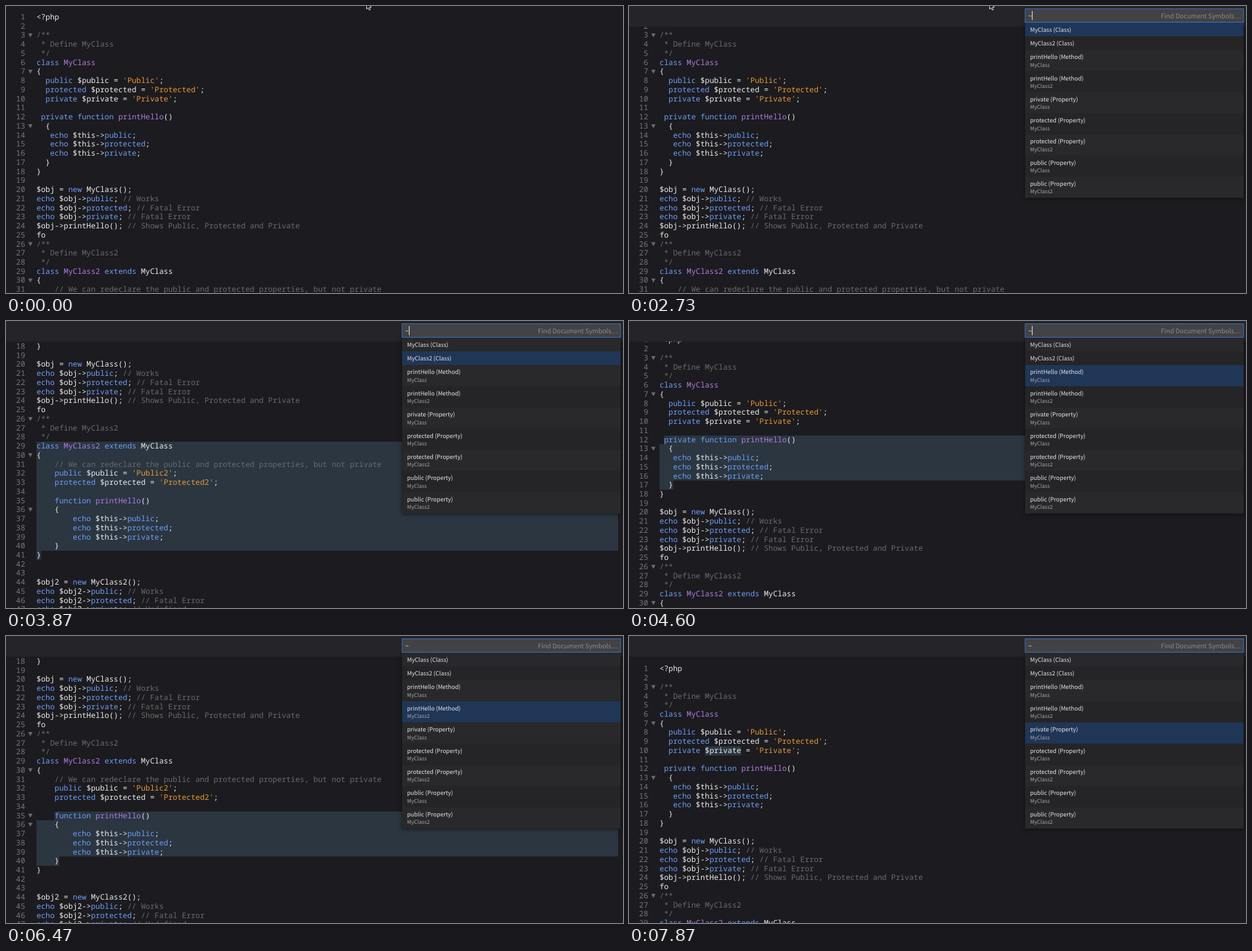
Animation of 1000 by 466 pixels, one loop 7.94 s. Source, as an HTML page with a canvas:

```html
<!DOCTYPE html>
<html lang="en">
<head>
<meta charset="utf-8">
<title>Find document symbols</title>
<style>
html, body { margin: 0; width: 100%; height: 100%; overflow: hidden; background: #1c1b1f; }
canvas { display: block; }
</style>
</head>
<body>
<canvas id="stage" width="1000" height="466"></canvas>
<script>
const ctx = document.getElementById('stage').getContext('2d');
const LOOP = 7940;
const LINE = 14.74, CHAR = 7.362, LEFT = 49.4, RIGHT = 992;
const MONO = '500 12.27px "Noto Sans Mono", "DejaVu Sans Mono", monospace';
const UI = '"Noto Sans CJK JP", "Noto Sans CJK SC", "Open Sans", sans-serif';
const COLOR = {
  back: '#1c1b1f', bar: '#252428', text: '#ececec', keyword: '#6c9ef8', name: '#b07be0',
  string: '#e59a35', comment: '#6b6a6c', gutter: '#77767a', selection: '#2b3641', active: '#203657'
};

const code = `<?php

/**
 * Define MyClass
 */
class MyClass
{
  public $public = 'Public';
  protected $protected = 'Protected';
  private $private = 'Private';

 private function printHello()
  {
   echo $this->public;
   echo $this->protected;
   echo $this->private;
  }
}

$obj = new MyClass();
echo $obj->public; // Works
echo $obj->protected; // Fatal Error
echo $obj->private; // Fatal Error
$obj->printHello(); // Shows Public, Protected and Private
fo
/**
 * Define MyClass2
 */
class MyClass2 extends MyClass
{
    // We can redeclare the public and protected properties, but not private
    public $public = 'Public2';
    protected $protected = 'Protected2';

    function printHello()
    {
        echo $this->public;
        echo $this->protected;
        echo $this->private;
    }
}


$obj2 = new MyClass2();
echo $obj2->public; // Works
echo $obj2->protected; // Fatal Error
echo $obj2->private; // Undefined`.split('\n');

const symbols = [
  ['MyClass (Class)'], ['MyClass2 (Class)'],
  ['printHello (Method)', 'MyClass'], ['printHello (Method)', 'MyClass2'],
  ['private (Property)', 'MyClass'],
  ['protected (Property)', 'MyClass'], ['protected (Property)', 'MyClass2'],
  ['public (Property)', 'MyClass'], ['public (Property)', 'MyClass2']
];

// selection: first line, first column, last line, end column
const steps = [
  { at: 0, scroll: 0 },
  { at: 2530, scroll: 0, row: 0 },
  { at: 3570, scroll: 227.6, row: 1, selection: [29, 0, 41, 1] },
  { at: 4330, scroll: -12.4, row: 2, selection: [12, 1, 17, 3] },
  { at: 5370, scroll: 227.6, row: 3, selection: [35, 4, 40, 5] },
  { at: 6900, scroll: -35.3, row: 4, selection: [10, 10, 10, 18] }
];
const EXTRA_FOLD = 6000, CARET_HALF = 560;
const folds = [3, 7, 13, 26, 30, 36];

const TOKEN = new RegExp([
  /(?<comment>\/\/.*|^\/\*\*| ^\*.*|^ \*.*)/, /(?<string>'[^']*')/,
  /(?<name>(?<=(?:class|function) )\w+)/, /(?<plain>\$\w+)/,
  /(?<keyword>\b(?:class|extends|public|protected|private|function|echo|new)\b)/,
  /(?<rest>\w+|[^\w\s$']+?(?=\/\/|\s|\w|\$|'|$))/
].map(r => r.source).join('|'), 'g');

const tokens = code.map(line => [...line.matchAll(TOKEN)].map(m => {
  const kind = Object.keys(m.groups).find(k => m.groups[k] !== undefined);
  return { text: m[0], col: m.index, color: COLOR[kind] || COLOR.text };
}));

function box(x, y, w, h, color) {
  ctx.fillStyle = color;
  ctx.fillRect(x, y, w, h);
}

function label(text, x, y, color, font, align = 'left') {
  ctx.font = font;
  ctx.textAlign = align;
  ctx.fillStyle = color;
  ctx.fillText(text, x, y);
}

function polygon(points) {
  ctx.beginPath();
  points.forEach(([x, y]) => ctx.lineTo(x, y));
  ctx.closePath();
}

const lineMiddle = (n, scroll) => 18 + (n - 1) * LINE - scroll;

function drawSelection([first, from, last, to], scroll) {
  for (let n = first; n <= last; n++) {
    const x = LEFT + (n === first ? from : 0) * CHAR;
    const end = n === last ? LEFT + to * CHAR : RIGHT;
    const top = Math.round(lineMiddle(n, scroll) - 7);
    const bottom = Math.round(lineMiddle(n + 1, scroll) - 7);
    box(x, top, end - x, bottom - top, COLOR.selection);
  }
}

function drawFold(n, scroll) {
  const y = lineMiddle(n, scroll);
  polygon([[36, y - 3], [43, y - 3], [39.5, y + 3.5]]);
  ctx.fillStyle = COLOR.comment;
  ctx.fill();
}

function drawCode(step, t) {
  const { scroll, selection } = step;
  if (selection) drawSelection(selection, scroll);
  tokens.forEach((line, i) => {
    const y = lineMiddle(i + 1, scroll) + 4;
    if (y < 0 || y > 480) return;
    label(i + 1, 31, y, COLOR.gutter, MONO, 'right');
    line.forEach(k => label(k.text, LEFT + k.col * CHAR, y, k.color, MONO));
  });
  folds.forEach(n => drawFold(n, scroll));
  if (t >= EXTRA_FOLD && step.row === 3) drawFold(35, scroll);
}

function drawPanel(step, t) {
  box(0, 0, 1000, 33.5, COLOR.bar);

  const pitch = step.row ? 34.4 : 34.25;
  const height = 44.6 + 7 * pitch;
  ctx.save();
  ctx.shadowColor = 'rgba(0,0,0,.5)';
  ctx.shadowBlur = 6;
  ctx.shadowOffsetY = 2;
  box(642, 27, 354, height, '#272628');
  ctx.restore();

  let y = 27;
  symbols.forEach(([title, owner], i) => {
    const h = owner ? pitch : 22.3;
    box(642, y, 354, h, i === step.row ? COLOR.active : i % 2 ? '#252426' : '#29282a');
    label(title, 650, y + 14.7, '#e6e6e6', '500 9.45px ' + UI);
    if (owner) label(owner, 650, y + 27.2, '#a9a9ab', '8.5px ' + UI);
    y += h;
  });

  box(642, 5, 354, 21.5, '#434245');
  ctx.strokeStyle = '#3474cf';
  ctx.lineWidth = 1;
  ctx.strokeRect(642, 4.5, 354, 22);
  label('~', 647, 19.5, '#eee', '10.4px ' + UI);
  label('Find Document Symbols…', 991.5, 19.5, '#8b8b8d', '10.4px ' + UI, 'right');
  if (Math.floor((t - step.at) / CARET_HALF) % 2 === 0) box(653, 8, 1, 15, '#f0f0f0');
}

function drawPointer() {
  const shape = [[0, 0], [0, 11], [2.5, 8.7], [4.2, 12.6], [6, 11.8], [4.3, 8], [7.7, 8]];
  polygon(shape.map(([x, y]) => [584.5 + x, y - 6]));
  ctx.fillStyle = '#000';
  ctx.fill();
  ctx.strokeStyle = '#f4f4f4';
  ctx.lineWidth = 1;
  ctx.stroke();
}

function draw(now) {
  const t = now % LOOP;
  const step = steps.filter(s => s.at <= t).pop();
  ctx.textRendering = 'geometricPrecision';
  box(0, 0, 1000, 466, COLOR.back);
  drawCode(step, t);
  if (step.row !== undefined) drawPanel(step, t);
  if (!step.selection) drawPointer();
}

const start = performance.now();
function tick() {
  draw(performance.now() - start);
  requestAnimationFrame(tick);
}
tick();
</script>
</body>
</html>
```
